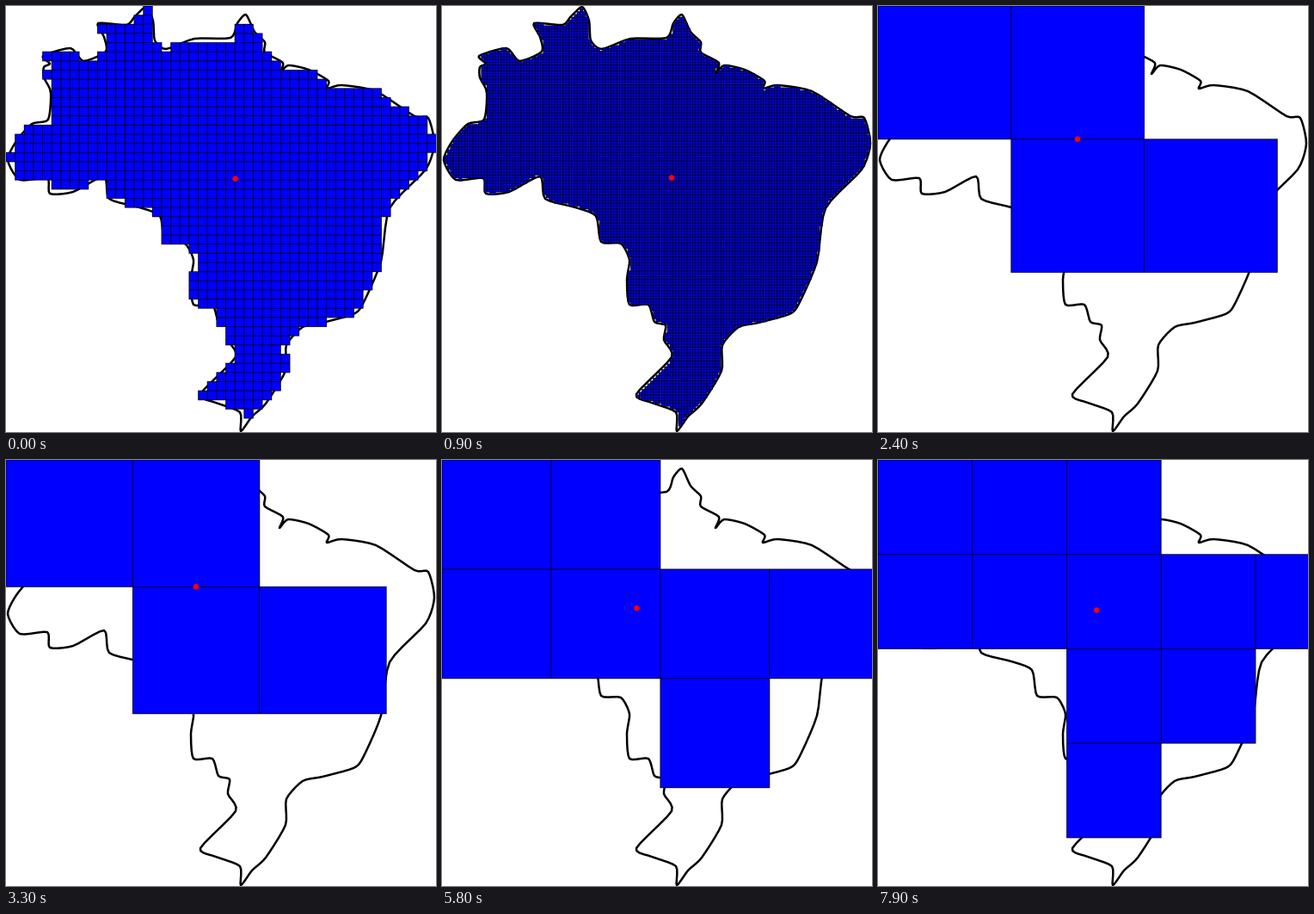
Write a matplotlib script that moves like this. It is 500 px wide and 495 px high and loops after 8 s.

```python
import numpy as np
import matplotlib.pyplot as plt
from matplotlib.animation import FuncAnimation
from matplotlib.path import Path

W, H = 500, 495
GRID_W, GRID_H = 611, 605          # the cells live on this finer pixel grid
SCALE = W / GRID_W
FRAMES, INTERVAL = 80, 100
LARGEST, FIRST = 200, 13           # cell sizes, shrinking by one per step
INSET = 0.9                        # cell centres must clear the border line
HALF_LINE = 0.45

# key points of the border, clockwise from the north-west
BORDER = [
    (52, 100), (44, 83), (44, 71), (51, 67), (43, 58), (75, 49), (90, 64),
    (116, 53), (114, 36), (107, 20), (140, 22), (150, 12), (163, 1),
    (171, 17), (173, 40), (186, 50), (219, 38), (261, 37), (269, 20),
    (279, 10), (289, 30), (301, 42), (301, 54), (322, 66), (318, 79),
    (328, 69), (352, 74), (375, 87), (373, 96), (390, 92), (430, 99),
    (475, 128), (491, 130), (498, 160), (488, 190), (446, 235), (436, 297),
    (415, 346), (404, 358), (368, 368), (345, 373), (326, 394), (325, 424),
    (302, 462), (286, 477), (273, 494), (272, 472), (244, 461), (226, 451),
    (267, 408), (258, 388), (260, 371), (247, 367), (240, 347), (218, 347),
    (215, 318), (218, 295), (208, 276), (185, 274), (179, 244), (155, 234),
    (120, 224), (114, 198), (78, 216), (51, 218), (48, 200), (16, 202),
    (2, 179), (12, 157), (30, 137), (49, 132),
]


def smooth(points, steps=5, tension=0.35):
    """Closed cardinal spline through the points."""
    p = np.array(points, float)
    nxt = np.roll(p, -1, axis=0)
    slope = tension * (nxt - np.roll(p, 1, axis=0))
    slope_nxt = np.roll(slope, -1, axis=0)
    t = (np.arange(steps) / steps)[None, :, None]
    curve = ((2 * t**3 - 3 * t**2 + 1) * p[:, None]
             + (t**3 - 2 * t**2 + t) * slope[:, None]
             + (3 * t**2 - 2 * t**3) * nxt[:, None]
             + (t**3 - t**2) * slope_nxt[:, None])
    curve = curve.reshape(-1, 2)
    return np.vstack([curve, curve[:1]])


border = smooth(BORDER)
region = Path(border)
xs, ys = np.arange(GRID_W), np.arange(GRID_H)


def well_inside(points):
    """Inside the region and clear of its border on every side."""
    shifts = [(dx, dy) for dx in (-INSET, INSET) for dy in (-INSET, INSET)]
    return np.all([region.contains_points(points + s) for s in shifts], axis=0)


def cells_of(n):
    """Which cells of size n have their centre inside, and the mean centre."""
    cx = (np.arange(-(-GRID_W // n)) + 0.5) * n * SCALE
    cy = (np.arange(-(-GRID_H // n)) + 0.5) * n * SCALE
    gx, gy = np.meshgrid(cx, cy)
    inside = well_inside(np.c_[gx.ravel(), gy.ravel()]).reshape(gx.shape)
    return inside, (gx[inside].mean(), gy[inside].mean())


def paint(inside, n):
    """Blue cells with shared one-pixel black edges on a clear ground."""
    full = inside[np.ix_(ys // n, xs // n)]
    cover = full.copy()
    cover[:, 1:] |= full[:, :-1]
    cover[1:] |= cover[:-1].copy()
    edge = (xs % n == 0)[None, :] | (ys % n == 0)[:, None]
    rgba = np.zeros((GRID_H, GRID_W, 4), np.uint8)
    rgba[..., 2] = 255 * (cover & ~edge)
    rgba[..., 3] = 255 * cover
    return rgba


fig = plt.figure(figsize=(W / 100, H / 100), dpi=100, facecolor="white")
ax = fig.add_axes([0, 0, 1, 1])
ax.axis("off")
ax.plot(*border.T, color="black", lw=1.8, solid_joinstyle="round", zorder=1)
extent = np.array([0, W, H, 0]) - HALF_LINE      # centre lines on cell edges
tiles = ax.imshow(np.zeros((GRID_H, GRID_W, 4), np.uint8), extent=extent,
                  aspect="auto", interpolation="bilinear", zorder=2)
dot = plt.Circle((0, 0), 3.3, color="red", lw=0, zorder=3)
ax.add_patch(dot)
ax.set_xlim(0, W)
ax.set_ylim(H, 0)


def update(frame):
    n = (FIRST - 1 - frame) % LARGEST + 1
    inside, centre = cells_of(n)
    tiles.set_data(paint(inside, n))
    dot.center = centre
    return tiles, dot


anim = FuncAnimation(fig, update, frames=FRAMES, interval=INTERVAL,
                     repeat=True, repeat_delay=0)
plt.show()
```
